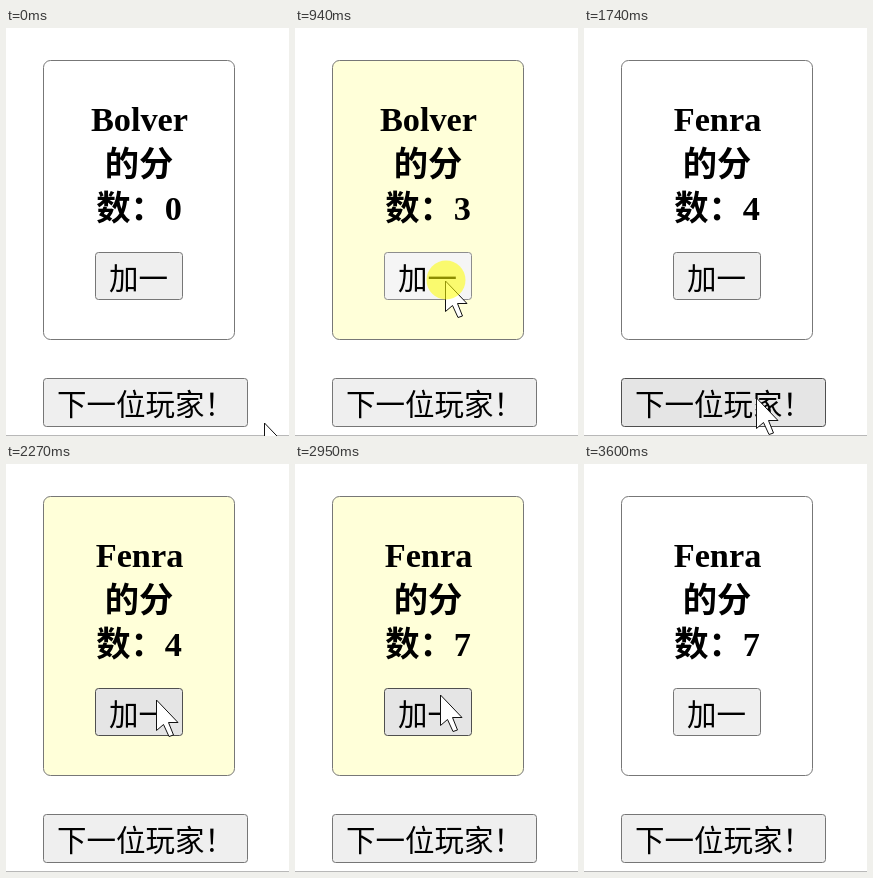
An HTML page that plays this animation: 283 by 408 pixels, repeating every 4090 ms.

```html
<!DOCTYPE html>
<html lang="zh-CN">
<head>
<meta charset="utf-8">
<title>计分板</title>
<style>
  html, body { margin: 0; height: 100%; overflow: hidden; background: #fff; }
  svg { display: block; width: 283px; height: 408px; }
  rect { fill: #fff; stroke: #777; }
  .button { fill: #efefef; stroke: #767676; }
  .button.hover { fill: #e5e5e5; stroke: #4f4f4f; }
  .button.active { fill: #f5f5f5; stroke: #8d8d8d; }
  text { font: 29.5px "Noto Sans CJK SC", sans-serif; }
  .title text { font: bold 34.3px "Liberation Serif", "Noto Sans CJK SC", serif; text-anchor: middle; }
</style>
</head>
<body>
<svg viewBox="0 0 283 408">
  <rect id="card" x="37.5" y="32.5" width="191" height="279" rx="7"/>
  <g class="title">
    <text id="player" x="133.5" y="103"></text>
    <text x="133" y="148">的分</text>
    <text id="score" x="133" y="192"></text>
  </g>
  <rect id="add" class="button" x="89.5" y="224.5" width="87" height="47" rx="3"/>
  <text x="103" y="260.5">加一</text>
  <rect id="next" class="button" x="37.5" y="350.5" width="204" height="48" rx="3"/>
  <text x="51" y="386.5">下一位玩家！</text>
  <path d="M0 407.5H283" stroke="#b8b8b8"/>
  <g id="cursor">
    <path d="M.5 0V30.5L7.5 24.5L13 36.5L17.5 35L12.5 22.5H22Z" fill="#fff" stroke="#111"/>
    <circle id="halo" cx="1" cy="-1" r="19.5" fill="#ff0" opacity=".55"/>
  </g>
</svg>
<script>
const LOOP = 4090;
const $ = id => document.getElementById(id);

// The pointer advances one step along its line at each listed time.
const moves = [
  { from: [258, 395], to: [150, 253], at: [70, 150, 230, 310, 390] },
  { from: [150, 253], to: [172, 370], at: [1120, 1200, 1270, 1330, 1400, 1470, 1530] },
  { from: [172, 370], to: [150, 236], at: [2080, 2140, 2200, 2270] },
  { from: [150, 236], to: [145, 231], at: [2340] },
  { from: [145, 231], to: [238, 415], at: [3140, 3200, 3270, 3340, 3400, 3470, 3540, 3600] }
];

const SWITCH = 1740;
const presses = [
  { down: 480, up: 540, halo: 390 },
  { down: 610, up: 690 },
  { down: 770, up: 850 },
  { down: 940, up: 990 },
  { down: 1600, up: SWITCH },
  { down: 2410, up: 2480 },
  { down: 2610, up: 2680 },
  { down: 2810, up: 2950 }
];

function pointerAt(t) {
  const move = moves.findLast(m => t >= m.at[0]) || moves[0];
  const p = move.at.filter(s => s <= t).length / move.at.length;
  return move.from.map((a, i) => a + (move.to[i] - a) * p);
}

function contains(rect, x, y) {
  const dx = x - rect.x.baseVal.value, dy = y - rect.y.baseVal.value;
  return dx >= 0 && dy >= 0 && dx <= rect.width.baseVal.value && dy <= rect.height.baseVal.value;
}

function draw(t) {
  const [x, y] = pointerAt(t);
  const pressed = presses.some(p => t >= p.down && t < p.up);
  const halo = presses.some(p => t >= (p.halo || p.down) && t < p.up);
  const score = presses.filter(p => p.up !== SWITCH && t >= p.up).length;

  $("cursor").setAttribute("transform", `translate(${x} ${y})`);
  $("halo").style.display = halo ? "" : "none";
  $("card").style.fill = contains($("card"), x, y) ? "#ffffd9" : "#fff";
  for (const id of ["add", "next"]) {
    const hover = contains($(id), x, y);
    $(id).classList.toggle("hover", hover);
    $(id).classList.toggle("active", hover && pressed);
  }
  $("player").textContent = t < SWITCH ? "Bolver" : "Fenra";
  $("score").textContent = "数：" + score;
}

function tick() {
  draw(performance.now() % LOOP);
  requestAnimationFrame(tick);
}
tick();
</script>
</body>
</html>
```
